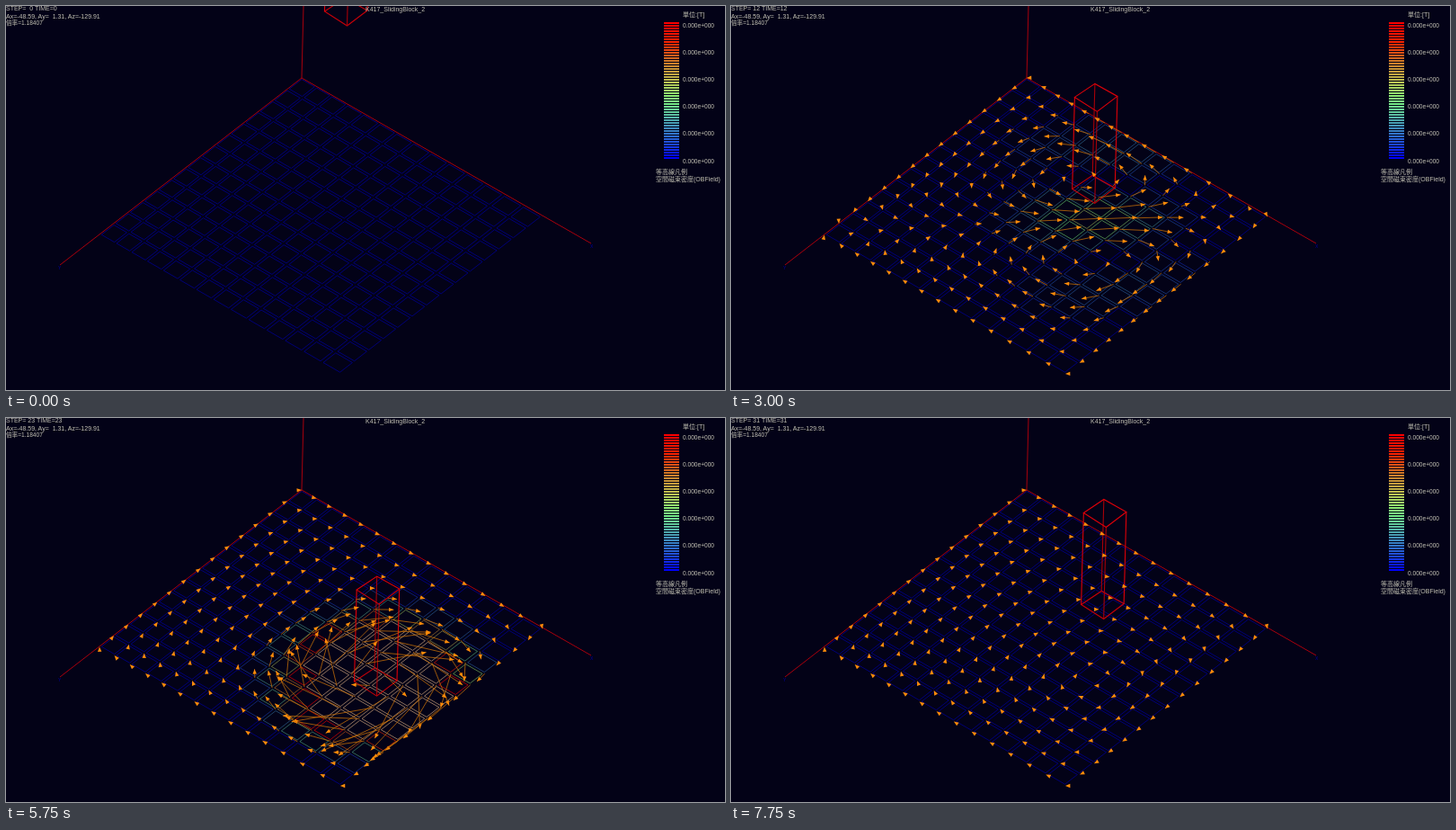
Recreate the animation shown at these times as an HTML page with a canvas. Size 800x427 px, loop 8000 ms.

```html
<!DOCTYPE html>
<html lang="ja">
<head>
<meta charset="utf-8">
<title>Field on a plate</title>
<style>
  html, body { margin: 0; width: 100%; height: 100%; overflow: hidden; background: #030217; }
  canvas, svg { position: absolute; left: 0; top: 0; width: 800px; height: 427px; }
  text {
    font: 7px "Liberation Sans", "Noto Sans CJK JP", "Noto Sans CJK", sans-serif;
    fill: #c4c3b4;
    white-space: pre;
  }
  .axis { font-size: 5px; fill: #00009c; }
  .num { font-size: 6.6px; }
</style>
</head>
<body>
<canvas id="view" width="800" height="427"></canvas>
<svg viewBox="0 0 800 427">
  <text id="clock" x="0" y="5"></text>
  <text x="0" y="13.5">Ax=-48.59, Ay=  1.31, Az=-129.91</text>
  <text x="0" y="21" style="font-size:6.6px">倍率=1.18407</text>
  <text x="400" y="6">K417_SlidingBlock_2</text>
  <text x="753" y="11.5">単位:[T]</text>
  <text x="723" y="187">等高線凡例</text>
  <text x="723" y="194.5">空間磁束密度(OBField)</text>
  <text class="axis" x="58" y="293">Y</text>
  <text class="axis" x="650" y="269">X</text>
  <g id="legend"></g>
</svg>
<script>
const ctx = document.getElementById('view').getContext('2d');
const clock = document.getElementById('clock');
const N = 14, STEPS = 32, STEP_MS = 250;
const O = [329, 80], U = [268, 154.5], V = [-225, 174.5];
const DET = U[0] * V[1] - U[1] * V[0];

const RAMP = [[0, 0, 255], [40, 98, 212], [80, 172, 172], [128, 255, 128],
              [190, 190, 80], [204, 120, 40], [255, 36, 0], [255, 0, 0]];

function ramp(v) {
  const p = Math.max(0, Math.min(1, v)) * (RAMP.length - 1);
  const i = Math.min(RAMP.length - 2, Math.floor(p));
  return RAMP[i].map((c, k) => Math.round(c + (RAMP[i + 1][k] - c) * (p - i)));
}

// Piecewise interpolation through [time, value] pairs.
function keyed(keys, t, ease = x => x) {
  if (t <= keys[0][0]) return keys[0][1];
  for (let i = 1; i < keys.length; i++) {
    const [t0, a] = keys[i - 1], [t1, b] = keys[i];
    if (t <= t1) return a + (b - a) * ease((t - t0) / (t1 - t0));
  }
  return keys[keys.length - 1][1];
}

const wave = x => (1 - Math.cos(Math.PI * x)) / 2;
const LIFT = [[12, 0], [17, -50], [23.5, 25], [30.5, -63], [37, 25]];
const SLIDE = [[0, 0], [1, 1], [14, 1], [16, 0.2], [17, 0]];
const PLUNGE = [[12, 0], [14, -0.3], [16, -1.1], [17.3, 0], [20, 1.3], [22, 3], [23, 3.2],
                [24.2, 0], [25, -2.6], [27, -2.2], [29, -0.5], [30.4, 0], [31, 0.12]];

const screen = (u, v) => [O[0] + u * U[0] + v * V[0], O[1] + u * U[1] + v * V[1]];
const spread = i => { const x = i / N; return 0.86 * x + 0.14 * x * x; };
const inside = x => 1 - (2 * x - 1) ** 4;

// Eddy currents follow the contours of a stream function that is zero at the rim.
function makeField(step) {
  const d = Math.min(step, 16);
  const x = 381 + 2 * d - O[0], y = 55 + 15.1 * d - O[1];
  const u0 = (x * V[1] - y * V[0]) / DET, v0 = (y * U[0] - x * U[1]) / DET;
  const slide = 0.115 * keyed(SLIDE, step), plunge = keyed(PLUNGE, step);
  const bump = (u, v, s) => Math.exp(-((u - u0) ** 2 + (v - v0) ** 2) / (2 * s * s));
  const psi = (u, v) => inside(u) * inside(v) *
    (slide * (u + v - u0 - v0) * Math.SQRT1_2 * bump(u, v, 0.21) +
     0.02 * plunge * bump(u, v, 0.155));
  const e = 0.002;
  const clamp = q => Math.max(0.01, Math.min(0.99, q));
  return {
    flow(u, v) {
      u = clamp(u);
      v = clamp(v);
      const ju = (psi(u, v + e) - psi(u, v - e)) / (2 * e);
      const jv = (psi(u - e, v) - psi(u + e, v)) / (2 * e);
      return [ju * U[0] + jv * V[0], ju * U[1] + jv * V[1]];
    },
    core: (u, v) => 0.15 * plunge ** 2 * bump(u, v, 0.155)
  };
}

function line(points, color, width = 1, close = false) {
  ctx.beginPath();
  points.forEach(p => ctx.lineTo(p[0], p[1]));
  if (close) ctx.closePath();
  ctx.strokeStyle = color;
  ctx.lineWidth = width;
  ctx.stroke();
}

function cellColor(v) {
  if (v < 0.08) return '#00008c';
  if (v > 1.25) return '#b08c6c';
  const [r, g, b] = ramp(v);
  return `rgba(${r},${g},${b},${0.55 + 0.2 * Math.min(1, v)})`;
}

function drawCells(field) {
  const gap = 0.07;
  for (let j = 0; j < N; j++) {
    for (let i = 0; i < N; i++) {
      const a = spread(i + gap), b = spread(i + 1 - gap);
      const c = (j + gap) / N, d = (j + 1 - gap) / N;
      const u = (a + b) / 2, v = (c + d) / 2;
      const value = (Math.hypot(...field.flow(u, v)) / 60) ** 1.5 + field.core(u, v);
      line([screen(a, c), screen(b, c), screen(b, d), screen(a, d)], cellColor(value), 0.8, true);
    }
  }
}

function drawArrow(p, f) {
  const len = Math.hypot(f[0], f[1]) || 1e-9;
  const cx = f[0] / len, cy = f[1] / len;
  const tip = [p[0] + f[0], p[1] + f[1]];
  if (len > 2) line([p, tip], '#c06c08', 0.8);
  const bx = tip[0] - cx * 5.4, by = tip[1] - cy * 5.4;
  ctx.fillStyle = '#ff8c0a';
  ctx.beginPath();
  ctx.moveTo(tip[0], tip[1]);
  ctx.lineTo(bx - cy * 2.2, by + cx * 2.2);
  ctx.lineTo(bx + cy * 2.2, by - cx * 2.2);
  ctx.fill();
}

function drawArrows(field) {
  for (let j = 0; j <= N; j++) {
    for (let i = 0; i <= N; i++) {
      const u = spread(i), v = j / N;
      drawArrow(screen(u, v), field.flow(u, v));
    }
  }
}

function drawMagnet(step) {
  const d = Math.min(step, 16), z = keyed(LIFT, step, wave);
  const x = 379.5 + 2.1 * d - 0.025 * z, y = 22 + 16.45 * d + z;
  const base = [[0, 0], [-25, -16], [-2.5, -31], [22.5, -17]].map(p => [x + p[0], y + p[1]]);
  const top = base.map(p => [p[0] + 2.7, p[1] - 102]);
  line(base, '#c80008', 1.1, true);
  base.forEach((p, i) => line([p, top[i]], i % 2 ? '#e00008' : '#a80008', 1.1));
  line(top, '#e00008', 1.1, true);
}

function drawLegend() {
  const bands = 51;
  for (let i = 0; i < bands; i++) {
    ctx.fillStyle = `rgb(${ramp(1 - i / (bands - 1))})`;
    ctx.fillRect(732, 18 + i * 3, 17, 2);
  }
}

function draw(step) {
  ctx.fillStyle = '#030217';
  ctx.fillRect(0, 0, 800, 427);
  const field = makeField(step);
  drawCells(field);
  line([[331, 0], O, [60, 288]], '#a8000c');
  line([O, [651, 264]], '#a8000c');
  drawMagnet(step);
  if (step > 0) drawArrows(field);
  drawLegend();
  clock.textContent = `STEP= ${String(step).padStart(2)} TIME=${step}`;
}

document.getElementById('legend').innerHTML = [0, 1, 2, 3, 4, 5]
  .map(i => `<text class="num" x="753" y="${24 + i * 30.1}">0.000e+000</text>`).join('');

const start = performance.now();
let shown = -1;
function tick() {
  const step = Math.floor((performance.now() - start) / STEP_MS) % STEPS;
  if (step !== shown) draw(shown = step);
  requestAnimationFrame(tick);
}
tick();
</script>
</body>
</html>
```
